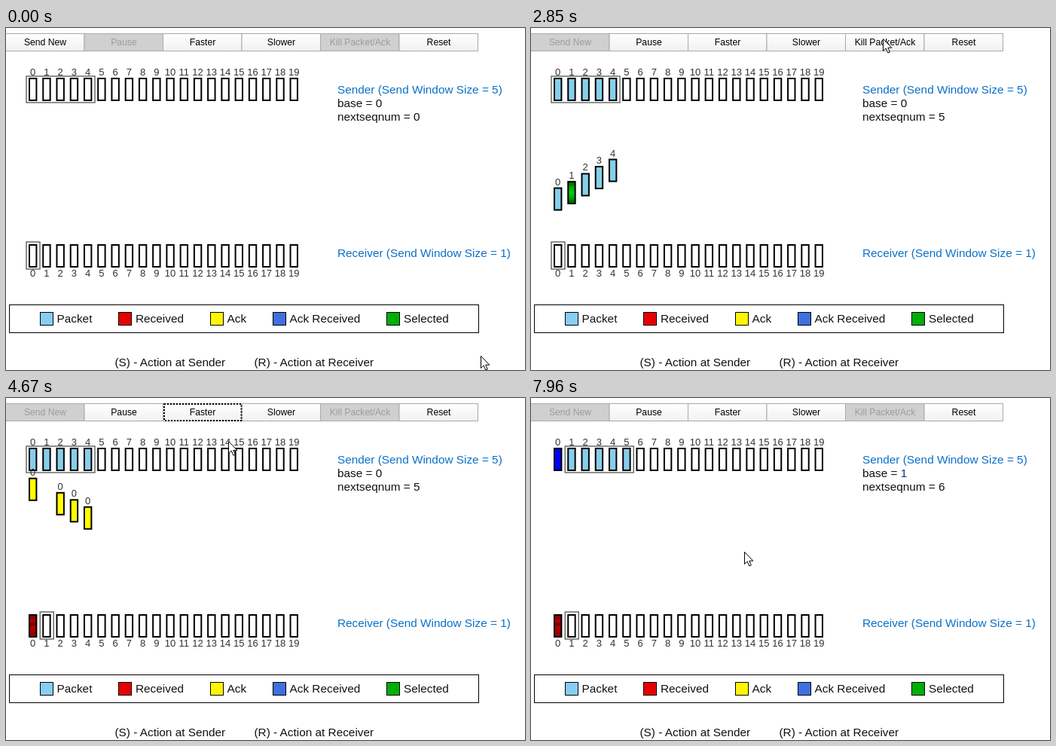
An HTML page that plays this animation: 689x454 px, repeating every 7.99 s.

```html
<!DOCTYPE html>
<html lang="en">
<head>
<meta charset="utf-8">
<title>Go-Back-N window</title>
<style>
  html, body { margin: 0; width: 100%; height: 100%; overflow: hidden; background: #fff; }
  svg { display: block; width: 689px; height: 454px; font: 15.35px "Liberation Sans", Arial, sans-serif; fill: #111; }
  .btn rect { fill: url(#face); stroke: #aaa; }
  .btn text { font-size: 12.2px; text-anchor: middle; fill: #000; }
  .btn.off rect { fill: #d0d0d0; }
  .btn.off text { fill: #9c9c9c; }
  .num { font-size: 13px; text-anchor: middle; fill: #333; }
  .slot { stroke: #000; stroke-width: 2; }
  .win { fill: none; stroke: #606060; stroke-width: 1.4; }
  .blue { fill: #0a70c8; }
</style>
</head>
<body>
<svg id="stage" viewBox="0 0 689 454">
  <defs>
    <linearGradient id="face" x2="0" y2="1">
      <stop offset="0" stop-color="#fff"/><stop offset="1" stop-color="#f1f1f1"/>
    </linearGradient>
    <linearGradient id="red" x2="0" y2="1">
      <stop offset=".12" stop-color="#8c0000"/><stop offset=".3" stop-color="#b80000"/>
      <stop offset=".42" stop-color="#6a0000"/><stop offset=".55" stop-color="#b80000"/>
      <stop offset=".8" stop-color="#980000"/>
    </linearGradient>
    <linearGradient id="green" x2="0" y2="1">
      <stop offset=".1" stop-color="#007000"/><stop offset=".25" stop-color="#0a0"/>
      <stop offset=".5" stop-color="#0c2"/><stop offset=".75" stop-color="#0a0"/>
      <stop offset=".9" stop-color="#007000"/>
    </linearGradient>
  </defs>
  <g id="bar"></g>
  <rect id="focus" x="210" y="8" width="102.5" height="22" fill="none" stroke="#000" stroke-width="2" stroke-dasharray="2 2"/>
  <g id="rows"></g>
  <text class="blue" x="440" y="87">Sender (Send Window Size = 5)</text>
  <text x="440" y="105">base = <tspan id="base">0</tspan></text>
  <text x="440" y="123">nextseqnum = <tspan id="next">0</tspan></text>
  <text class="blue" x="440" y="304">Receiver (Send Window Size = 1)</text>
  <rect x="4.5" y="367.5" width="623" height="37" fill="none" stroke="#000"/>
  <g id="legend"></g>
  <text x="144.5" y="449">(S) - Action at Sender</text>
  <text x="329.5" y="449">(R) - Action at Receiver</text>
  <g id="flight"></g>
  <path id="cursor" d="M.5.5V16.5L4.2 13L6.8 19L9.3 18L6.8 12.2H11.8Z" fill="#fff" stroke="#000"/>
</svg>
<script>
const LOOP = 7990, PITCH = 18.24, TOP = 66, BOTTOM = 288, TRIP = BOTTOM - TOP;
const SKY = '#87ceeb';
const $ = id => document.getElementById(id);

function add(parent, tag, attrs, text) {
  const el = document.createElementNS('http://www.w3.org/2000/svg', tag);
  for (const k in attrs) el.setAttribute(k, attrs[k]);
  if (text !== undefined) el.textContent = text;
  return parent.appendChild(el);
}
const set = (el, name, value) => {
  if (el.getAttribute(name) !== String(value)) el.setAttribute(name, value);
};
const show = (el, on) => set(el, 'visibility', on ? 'visible' : 'hidden');
const slotX = i => 35.6 + i * PITCH;
const slot = (parent, x, y) =>
  add(parent, 'rect', { class: 'slot', x: x - 4.6, y: y + 1, width: 9.4, height: 29, fill: '#fff' });
const label = (parent, x, y, s) => add(parent, 'text', { class: 'num', x, y }, s);

// Toolbar
const buttons = ['Send New', 'Pause', 'Faster', 'Slower', 'Kill Packet/Ack', 'Reset'].map((name, i) => {
  const g = add($('bar'), 'g', { class: 'btn' }), x = i * 104.5 - 0.5;
  add(g, 'rect', { x, y: 7.5, width: 104.5, height: 23 });
  add(g, 'text', { x: x + 52.5, y: 23 }, name);
  return g;
});
const enable = (i, on) => set(buttons[i], 'class', on ? 'btn' : 'btn off');

// Slots
const sender = [], receiver = [];
for (let i = 0; i < 20; i++) {
  const x = slotX(i);
  sender.push(slot($('rows'), x, TOP));
  receiver.push(slot($('rows'), x, BOTTOM - 1));
  label($('rows'), x, 63, i);
  label($('rows'), x, 330, i);
}
const sendWin = add($('rows'), 'rect', { class: 'win', x: 27, y: 64, width: 91, height: 35 });
const recvWin = add($('rows'), 'rect', { class: 'win', x: 27, y: 284, width: 18, height: 36 });

// Legend
[[45, SKY.replace('eb', 'f4'), 'Packet', 67.5], [149, '#e60000', 'Received', 172],
 [271, '#fff700', 'Ack', 293.5], [354, '#4070e0', 'Ack Received', 376.5],
 [505, '#00ae08', 'Selected', 528]].forEach(([x, fill, name, tx]) => {
  add($('legend'), 'rect', { x: x + .5, y: 377.5, width: 17, height: 17, fill, stroke: '#000' });
  add($('legend'), 'text', { x: tx, y: 391 }, name);
});

// Events
const sent = [772, 894, 1044, 1179, 1315, 5720];
const PICK = 1850, KILL = 2950, FASTER = 3605;
const speeds = [[0, 0.07], [FASTER, 0.125], [4080, 0.248]];

// Distance covered since time zero under the changing speed
function travel(t) {
  return speeds.reduce((sum, [from, v], i) => {
    const to = i + 1 < speeds.length ? speeds[i + 1][0] : Infinity;
    return sum + v * Math.max(0, Math.min(t, to) - from);
  }, 0);
}

const packets = sent.map((t0, i) => {
  const g = add($('flight'), 'g', {});
  return { g, x: slotX(i), start: travel(t0), box: slot(g, slotX(i), 0), tag: label(g, slotX(i), -3, i) };
});

// Pointer path: time, x, y
const path = [
  [0, 630, 435], [30, 630, 435], [680, 78, 19], [1330, 78, 19], [1600, 61, 165], [1800, 54, 150],
  [1900, 54, 150], [2400, 468, 18], [2850, 467, 14], [2980, 466, 13], [3130, 400, 2], [3280, 321, 6],
  [3480, 281, 17], [4090, 281, 17], [4670, 295, 57], [4880, 300, 78], [5260, 300, 78], [5480, 140, 18],
  [5610, 66, 1], [5690, 60, 14], [5770, 60, 14], [6030, 235, 200], [6450, 347, 278],
  [6870, 326, 232], [7500, 294, 208], [7850, 294, 208], [7960, 283, 204], [LOOP, 283, 204]
];
const slope = (i, k) => (path[i + 1][k] - path[i][k]) / (path[i + 1][0] - path[i][0]);
function tangent(i, k) {
  if (i === 0 || i === path.length - 1) return 0;
  const a = slope(i - 1, k), b = slope(i, k);
  return a * b <= 0 ? 0 : 2 * a * b / (a + b);
}
function pointer(t, k) {
  let i = 0;
  while (i < path.length - 2 && t >= path[i + 1][0]) i++;
  const h = path[i + 1][0] - path[i][0], u = (t - path[i][0]) / h;
  const w = u * u * (3 - 2 * u);
  return path[i][k] * (1 - w) + path[i + 1][k] * w
    + h * u * (1 - u) * ((1 - u) * tangent(i, k) - u * tangent(i + 1, k));
}

function draw(t) {
  const dist = travel(t), next = sent.filter(s => t >= s).length;
  const first = dist - packets[0].start;
  const got = first >= TRIP ? 1 : 0, base = first >= 2 * TRIP ? 1 : 0;
  const picked = t >= PICK && t < KILL;

  enable(0, next < base + 5);
  enable(1, next > 0);
  enable(4, picked);
  show($('focus'), t >= FASTER && t < sent[5]);

  sender.forEach((el, i) => set(el, 'fill', i < base ? '#00f' : i < next ? SKY : '#fff'));
  set(receiver[0], 'fill', got ? 'url(#red)' : '#fff');
  set(sendWin, 'x', 27 + base * PITCH);
  set(recvWin, 'x', 27 + got * PITCH);
  $('base').textContent = base;
  set($('base'), 'fill', base ? '#0a3a80' : '#111');
  $('next').textContent = next;

  packets.forEach((p, i) => {
    const d = dist - p.start, ack = d >= TRIP;
    const live = t >= sent[i] && d < 2 * TRIP && !(i === 1 && t >= KILL);
    show(p.g, live);
    if (!live) return;
    set(p.g, 'transform', `translate(0 ${(BOTTOM - Math.abs(TRIP - d)).toFixed(2)})`);
    set(p.box, 'fill', ack ? '#ff0' : i === 1 && picked ? 'url(#green)' : SKY);
    p.tag.textContent = ack ? 0 : i;
  });
  set($('cursor'), 'transform', `translate(${pointer(t, 1).toFixed(1)} ${pointer(t, 2).toFixed(1)})`);
}

const begin = performance.now();
function tick() {
  draw((performance.now() - begin) % LOOP);
  requestAnimationFrame(tick);
}
tick();
</script>
</body>
</html>
```
